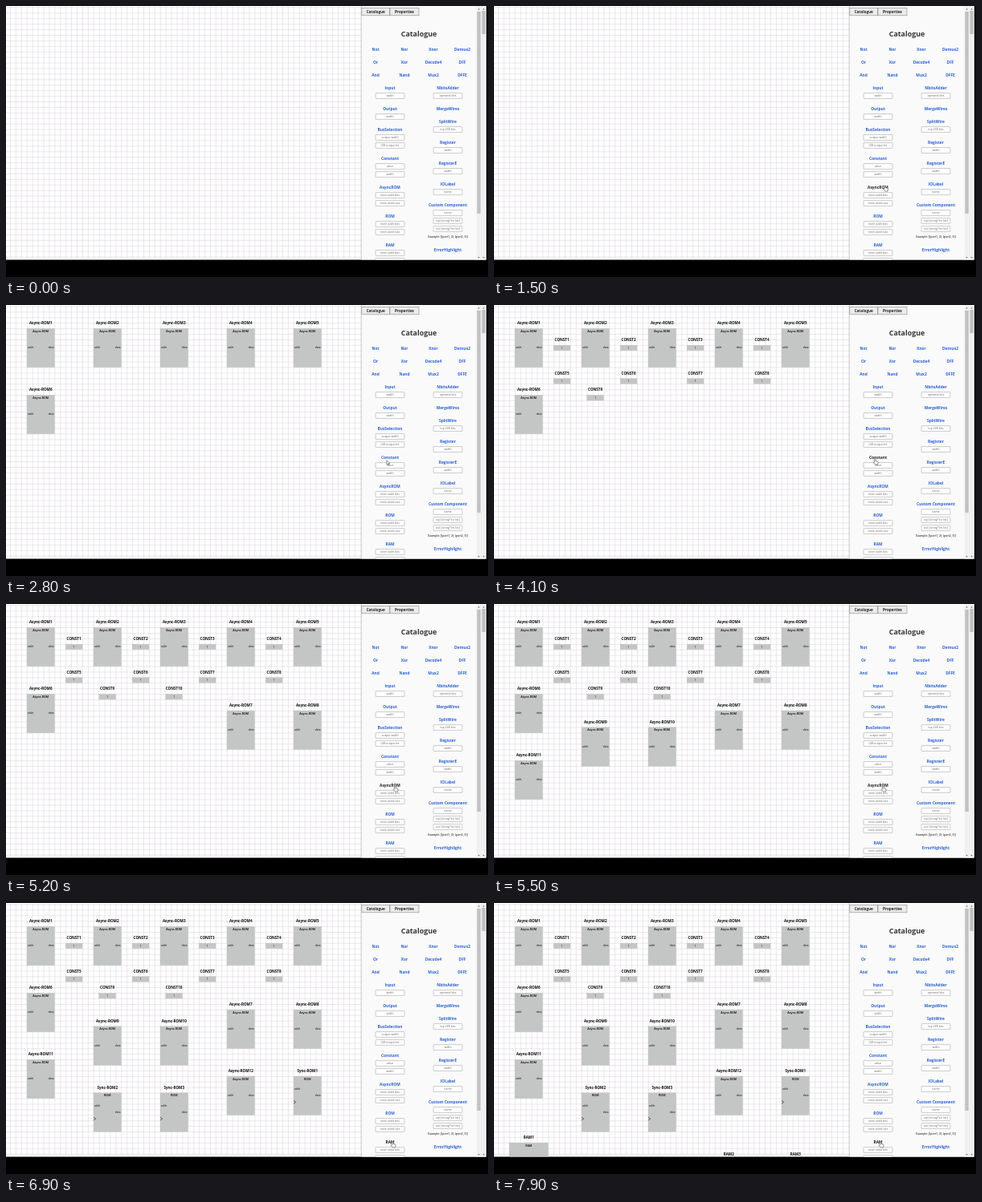
An HTML page for the animation above (8000 ms loop, 600 by 338 pixels).

```html
<!DOCTYPE html>
<html lang="en">
<head>
<meta charset="utf-8">
<title>Component catalogue</title>
<style>
html, body { margin: 0; width: 100%; height: 100%; overflow: hidden; background: #000; }
svg { display: block; width: 600px; height: 338px; }
text { font-family: "Open Sans", "Noto Sans", sans-serif; font-weight: 700; text-anchor: middle; }
.title { font-size: 8.9px; fill: #363636; }
.link { font-size: 4.85px; fill: #2c62d6; }
.link.on, .tab { fill: #222; }
.tab { font-size: 4.6px; }
.hint { font-size: 3.5px; font-weight: 400; fill: #666; }
.note { font-size: 3.4px; font-weight: 600; fill: #333; }
.name { font-size: 4.6px; fill: #111; }
.kind { font-size: 3.5px; fill: #222; }
.port { font-size: 3.1px; font-weight: 600; fill: #333; }
.start { text-anchor: start; }
.end { text-anchor: end; }
.body { fill: #c4c5c5; stroke: #b8b8b8; stroke-width: .3; }
.field { fill: #fff; stroke: #aaa; stroke-width: .6; }
.button { fill: #ececec; stroke: #888; stroke-width: .6; }
</style>
</head>
<body>
<svg viewBox="0 0 600 338">
  <defs>
    <pattern id="grid" x="5" y="1.4" width="6.917" height="6.917" patternUnits="userSpaceOnUse">
      <path d="M0 .3H6.917M.3 0V6.917" stroke="#d6ccd8" stroke-width=".6"/>
    </pattern>
    <clipPath id="page"><rect width="597.6" height="316.6"/></clipPath>
  </defs>
  <rect width="600" height="338"/>
  <g clip-path="url(#page)">
    <rect width="600" height="317" fill="#fff"/>
    <rect y="1" width="443" height="316" fill="url(#grid)"/>
    <g id="parts"></g>
    <g id="panel"></g>
    <path id="arrow" d="M0 0V5.6L1.3 4.4 2.2 6.4 3 6 2.1 4.1H3.9Z" fill="#fff" stroke="#222" stroke-width=".45"/>
    <path id="hand" d="M.2 0Q1 0 1 .8V2.6L3.4 3.1Q4.2 3.3 4.1 4.2L3.6 7H.6L-1.6 4.6Q-1.9 3.8-.6 4.1V.8Q-.6 0 .2 0Z" fill="#fff" stroke="#222" stroke-width=".5"/>
  </g>
</svg>
<script>
const LOOP = 8000, TICK = 100, PITCH = 83;
const $ = id => document.getElementById(id);
const panel = $("panel"), parts = $("parts");
const links = [], shown = [];

function add(parent, tag, attrs, text) {
  const node = document.createElementNS("http://www.w3.org/2000/svg", tag);
  for (const key in attrs) node.setAttribute(key, attrs[key]);
  if (text) node.textContent = text;
  parent.appendChild(node);
  return node;
}
const rect = (g, x, y, width, height, more) => add(g, "rect", { x, y, width, height, ...more });
const label = (g, cls, x, y, text) => add(g, "text", { class: cls, x, y }, text);

function link(x, y, text) {
  links.push({ x, y, half: text.length * 1.6, node: label(panel, "link", x, y + 1.5, text) });
}

function field(x, y, hint) {
  rect(panel, x - 17.9, y - 3.4, 35.8, 6.8, { class: "field", rx: .4 });
  label(panel, "hint", x, y + 1, hint);
}

function tab(x, width, text) {
  rect(panel, x, 2.4, width, 9.4, { class: "button" });
  label(panel, "tab", x + width / 2, 8.7, text);
}

function scrollbar(x, top, height) {
  rect(panel, x - 3, 0, 6, 317, { fill: "#f0f0f0" });
  rect(panel, x - 2.2, top, 4.4, height, { fill: "#c1c1c1" });
  add(panel, "path", { d: `M${x - 1.2} 4.4h2.4l-1.2-1.4zm0 308.6h2.4l-1.2 1.4z`, fill: "#666" });
}

// Each line holds a title, then its input hints.
function column(x, text) {
  let y = 102;
  for (const line of text.trim().split("\n")) {
    const [title, ...hints] = line.trim().split("|");
    link(x, y, title);
    hints.forEach((hint, i) => field(x, y + 10 * (i + 1), hint));
    y += 16 + 10 * hints.length;
  }
}

function drawPanel() {
  rect(panel, 442.5, 0, 157.5, 317, { fill: "#fafafa" });
  rect(panel, 442.2, 0, .6, 317, { fill: "#bbb" });
  scrollbar(588.6, 7, 252);
  scrollbar(594.6, 6, 29);
  tab(442.8, 34.8, "Catalogue");
  tab(478, 36, "Properties");
  label(panel, "title", 514, 38.1, "Catalogue");
  "Not Nor Xnor Demux2 Or Xor Decode4 DFF And Nand Mux2 DFFE".split(" ")
    .forEach((text, i) => link(460 + 36 * (i % 4), 54 + 16 * Math.floor(i / 4), text));
  column(478, `Input|width
    Output|width
    BusSelection|output width|LSB output bit
    Constant|value|width
    AsyncROM|mem addr bits|mem word size
    ROM|mem addr bits|mem word size
    RAM|mem addr bits|mem word size`);
  column(550, `NbitsAdder|operand bits
    MergeWires
    SplitWire|top LSB bits
    Register|width
    RegisterE|width
    IOLabel|name
    Custom Component|name|inp [string*int list]|out [string*int list]`);
  label(panel, "note", 550, 289.1, "Example: [(port1, 2); (port2, 3)]");
  link(550, 304, "ErrorHighlight");
}

function part(time, title, x, y, width, height) {
  const g = add(parts, "g", {});
  rect(g, x, y, width, height, { class: "body" });
  label(g, "name", x + width / 2, y - 5.2, title);
  shown.push([time, g]);
  return g;
}

// After the first row, memories stack below it, a quarter pitch lower in turn.
function memory(time, kind, n, slot) {
  const ram = kind === "RAM", sync = kind === "Sync-ROM";
  const turn = slot % 5, round = Math.floor(slot / 5);
  const col = round ? (turn && (turn + 1) % 4 + 1) : turn;
  const row = round && 4 * round + Math.ceil(turn / 2) + ram;
  const width = ram ? 48.4 : 34.5;
  const x = 26 + PITCH * col - (width - 34.5) / 2, y = 29.3 + PITCH / 4 * row;
  const g = part(time, kind + n, x, y, width, 48.4);
  label(g, "kind", x + width / 2, y + 4.6, sync ? "ROM" : kind);
  if (ram) return;
  label(g, "port start", x + 1, y + (sync ? 16.8 : 24.8), "addr");
  label(g, "port end", x + width - 1, y + 24.8, "data");
  if (sync) add(g, "path", { d: `M${x} ${y + 30.4}l2.8 1.9-2.8 1.9`, fill: "none", stroke: "#222", "stroke-width": .6 });
}

// Constants fill the half-pitch gaps, four to a row.
function constant(time, kind, n) {
  const row = Math.floor((n - 1) / 4), shift = row > 1 ? PITCH / 2 : 0;
  const x = 74.2 + PITCH * ((n - 1) % 4) + shift;
  const y = 50.2 + PITCH / 2 * row - shift / 2;
  const g = part(time, kind + n, x, y, 20.8, 6.5);
  label(g, "port", x + 10.4, y + 4.3, "1");
}

function drawParts() {
  // Bursts of clicks: kind, how many, time of the first.
  const bursts = [
    ["Async-ROM", 2, 1900], ["Async-ROM", 4, 2200], ["CONST", 8, 3000], ["CONST", 1, 3900],
    ["CONST", 1, 4200], ["Async-ROM", 1, 5000], ["Async-ROM", 5, 5200],
    ["Sync-ROM", 1, 6100], ["Sync-ROM", 2, 6300], ["RAM", 1, 7200], ["RAM", 2, 7600]
  ];
  const count = {};
  let slot = 0;
  for (const [kind, total, start] of bursts) {
    for (let i = 0; i < total; i++) {
      const n = count[kind] = (count[kind] || 0) + 1, time = start + i * TICK;
      if (kind === "CONST") constant(time, kind, n);
      else memory(time, kind, n, slot++);
    }
  }
}

// Pointer glides: first step, last step, end point.
const glides = [
  [100, 100, 559, 71], [200, 200, 500, 218], [1100, 1700, 481, 226.5],
  [2600, 2600, 530, 222], [2700, 2800, 474, 193.5], [3000, 3000, 474, 192],
  [4300, 4400, 520, 8], [4500, 4500, 553, 290], [4600, 4700, 482, 227],
  [5200, 5200, 484, 227], [5700, 5700, 548, 255], [5800, 6000, 477, 261],
  [6500, 6900, 481, 298]
];

function pointer(t) {
  let at = null;
  for (const [start, end, x, y] of glides) {
    if (t < start) break;
    const p = Math.min(1, (t - start + TICK) / (end - start + TICK));
    const from = at || [x, y];
    at = [from[0] + (x - from[0]) * p, from[1] + (y - from[1]) * p];
  }
  return at;
}

function draw() {
  const t = Math.floor(performance.now() % LOOP / TICK) * TICK;
  for (const [time, g] of shown) g.style.display = t >= time ? "" : "none";
  const at = pointer(t);
  let over = false;
  for (const { x, y, half, node } of links) {
    const hit = at !== null && Math.abs(at[0] - x) < half && Math.abs(at[1] - y) < 3.2;
    node.classList.toggle("on", hit);
    over = over || hit;
  }
  $("arrow").style.display = at && !over ? "" : "none";
  $("hand").style.display = over ? "" : "none";
  if (at) $(over ? "hand" : "arrow").setAttribute("transform", `translate(${at})`);
  requestAnimationFrame(draw);
}

drawPanel();
drawParts();
draw();
</script>
</body>
</html>
```
